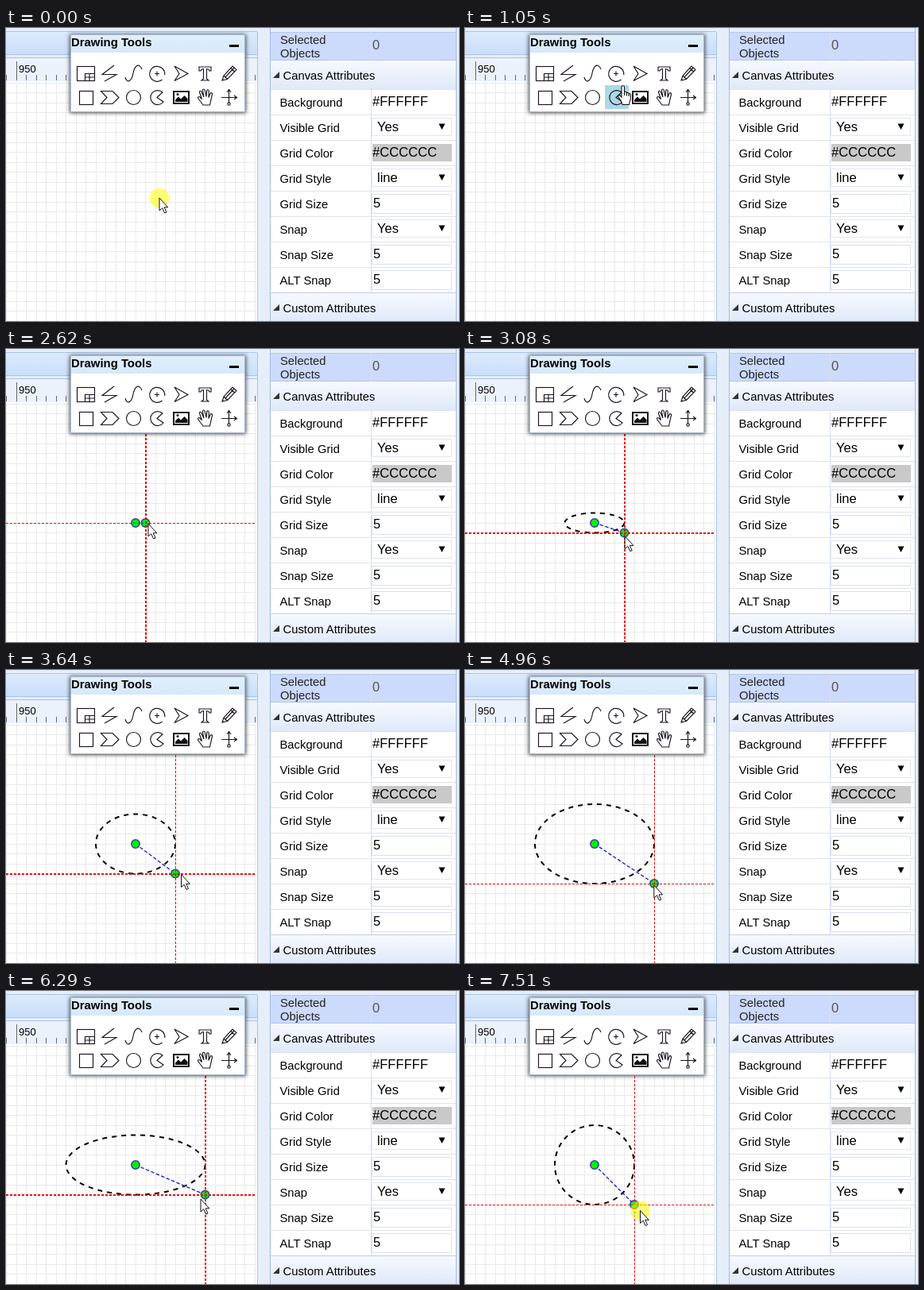
Write an HTML page that moves like this. It is 570 px wide and 369 px high and loops after 8000 ms.

```html
<!DOCTYPE html>
<html lang="en">
<head>
<meta charset="utf-8">
<title>Drawing tools</title>
<style>
html, body { margin: 0; width: 100%; height: 100%; overflow: hidden; background: #e6eefa; }
svg { display: block; width: 570px; height: 369px; font: 14.8px "Liberation Sans", Arial, sans-serif; }
.val { font-size: 16.6px; }
.icon { fill: none; stroke: #1c1420; stroke-width: 1.15; }
.crisp { shape-rendering: crispEdges; }
</style>
</head>
<body>
<svg viewBox="0 0 570 369">
  <defs>
    <linearGradient id="bar" x2="0" y2="1"><stop stop-color="#dcebfd"/><stop offset="1" stop-color="#c9defa"/></linearGradient>
    <linearGradient id="head" x2="0" y2="1"><stop stop-color="#f6f9fe"/><stop offset="1" stop-color="#dfe8f9"/></linearGradient>
    <linearGradient id="title" x2="0" y2="1"><stop stop-color="#e2effc"/><stop offset="1" stop-color="#d5e8fb"/></linearGradient>
    <filter id="shade" x="-10%" y="-20%" width="120%" height="140%"><feGaussianBlur stdDeviation="2.4"/></filter>
    <clipPath id="area"><rect y="67" width="314" height="302"/></clipPath>
  </defs>

  <rect width="570" height="369" fill="#e6eefa"/>
  <rect y="5" width="316" height="28" fill="url(#bar)"/>
  <path class="crisp" d="M0 4.5H316M0 33.5H316M0 37.5H316" stroke="#a9c3ea"/>
  <rect y="38" width="316" height="29" fill="#ebf2fc"/>
  <rect y="67" width="316" height="302" fill="#fff"/>
  <path id="grid" class="crisp" stroke="#e9e9e9"/>
  <path id="ticks" class="crisp" stroke="#666"/>
  <text x="16" y="55.5" font-size="13">950</text>
  <path class="crisp" d="M316.5 5V369" stroke="#a9c3ea"/>

  <g id="panel"></g>

  <g id="drawing" clip-path="url(#area)">
    <ellipse id="oval" cx="163" cy="219" fill="none" stroke="#000" stroke-width="2" stroke-dasharray="6 6"/>
    <path id="radius" stroke="#1616c8" stroke-width="1.3" stroke-dasharray="4.5 2.5"/>
    <g fill="#00f000" stroke="#3a3ab0" stroke-width="1.5">
      <circle id="centre" cx="163" cy="219" r="5.2"/>
      <circle id="knob" r="5.2"/>
    </g>
    <g class="crisp" stroke="#f00000" stroke-dasharray="3 2">
      <path id="vline"/>
      <path id="hline"/>
    </g>
  </g>

  <rect x="80" y="8" width="222" height="99" fill="#333" opacity=".85" filter="url(#shade)"/>
  <rect x="81.5" y="8.5" width="219" height="97" fill="#fff" stroke="#a4b8cc"/>
  <rect x="82" y="9" width="218" height="22" fill="url(#title)"/>
  <text x="82" y="23" font-size="14.9" font-weight="bold">Drawing Tools</text>
  <rect x="281" y="21" width="12" height="3"/>
  <rect id="cell" x="176" width="30" height="30" fill="#add8e6"/>

  <g class="icon">
    <rect x="89.5" y="48.5" width="22" height="18"/>
    <path d="M99.5 66V57.5H111M99.5 62H111M105 57.5V66"/>
    <path d="M136 47L121 58.500H139L124 67"/>
    <path d="M150 62C152 70 158 68 160 57S168 44 171 52"/>
    <path d="M196.500 65A9.500 9.500 0 1 1 199.700 59M187 57.500H193M190 54.500V60.500"/>
    <path d="M212 48L229 57.500L212 66.500L218 57.500Z"/>
    <path d="M243 49H258V54H256C255.500 52 255 51.500 252.500 51.500V64L255 66H246L248.500 64V51.500C246 51.500 245.500 52 245 54H243Z"/>
    <path d="M272 66L274 60L285 48L290 52.500L278.500 64.500ZM274 60L278.500 64.500M276 62L287 50M283 50.500L287.500 55M272 66L274 65"/>
    <rect x="92.500" y="79.500" width="17" height="17"/>
    <path d="M119.500 79.500H134L142 87.500L134 95.500H119.500L127 87.500Z"/>
    <circle cx="160.500" cy="87.500" r="9"/>
    <path d="M197 81A9 9 0 1 0 198 93L190 87.500Z"/>
    <rect x="211" y="80" width="19" height="15" fill="#fff" stroke-width="2"/>
    <path d="M213 93V90.500L217 86.500L220 89.500L224.500 85L228.500 89V93Z" fill="#111" stroke="none"/>
    <circle cx="216" cy="83.500" r="1.500" fill="#111" stroke="none"/>
    <path d="M248 97L242 89C240.500 87 243 85.500 244.500 87.500L246.500 89.500L243.500 81C243 79 245.500 78.500 246.200 80.500L249 87L247.500 78.500C247.500 76.500 250 76.500 250.300 78.500L252 86.500L252.700 79C253 77 255.300 77.500 255.200 79.500L255 87.500L257 82.500C257.700 81 260 81.500 259.500 83.500L257.500 92L256.500 97Z"/>
    <path d="M280.500 94V78M278 81L280.500 77.500L283 81M271 87.500H290M287 85L290.500 87.500L287 90"/>
    <circle cx="280.500" cy="95.500" r="1.700"/>
  </g>

  <circle id="glow" r="12.2" fill="#ff0" opacity=".55"/>
  <path id="arrow" d="M0 0V16L3.700 12.700L6.600 19L9 18L6.200 11.800H10.800Z" fill="#fff" stroke="#111" stroke-linejoin="round"/>
  <path id="hand" d="M-2 11V1.500C-2 -.8 1.500 -.8 1.500 1.500V8C2.500 6.800 4.300 7.200 4.500 8.800C5.500 7.800 7 8.300 7.100 9.800C8.100 9 9.300 9.600 9.300 11V16C9.300 19 7.500 20 7.500 23.500H-1C-1 20 -3.500 18 -6 14C-7.200 12 -5 10.800 -3.600 12.300L-2 14ZM1.500 8V12M4.500 9V12.500M7.100 10V13" fill="#fff" stroke="#111" stroke-width="1.100"/>
</svg>
<script>
const LOOP = 8000, UNIT = 12.5, CX = 163, CY = 219;
const $ = id => document.getElementById(id);
const set = (id, attrs) => { for (const k in attrs) $(id).setAttribute(k, attrs[k]); };
const show = (id, on) => set(id, { visibility: on ? 'visible' : 'hidden' });
const crisp = v => Math.floor(v) + 0.5;

function drawRulers() {
  let grid = '', ticks = '';
  for (let x = 0.5; x < 314; x += UNIT) {
    grid += `M${crisp(x)} 67V369`;
    ticks += `M${crisp(x)} ${x === 13 ? 42 : 59}V66`;
  }
  for (let y = 69; y < 369; y += UNIT) grid += `M0 ${crisp(y)}H314`;
  set('grid', { d: grid });
  set('ticks', { d: ticks });
}

function drawPanel() {
  const rect = (x, y, w, h, fill, stroke = 'none') =>
    `<rect x="${x}" y="${y}" width="${w}" height="${h}" fill="${fill}" stroke="${stroke}"/>`;
  const text = (x, y, s, extra = '') => `<text x="${x}" y="${y}" ${extra}>${s}</text>`;
  const line = (d, color) => `<path class="crisp" d="${d}" stroke="${color}"/>`;
  const head = (y, s) => rect(333, y, 233, 37, 'url(#head)') +
    `<path d="M336 ${y + 22}L344 ${y + 14}V${y + 22}Z" fill="#333"/>` + text(348.5, y + 23.5, s);
  const rows = [
    ['Background', '#FFFFFF', 'plain'], ['Visible Grid', 'Yes', 'list'],
    ['Grid Color', '#CCCCCC', 'swatch'], ['Grid Style', 'line', 'list'],
    ['Grid Size', '5', 'input'], ['Snap', 'Yes', 'list'],
    ['Snap Size', '5', 'input'], ['ALT Snap', '5', 'input']
  ];
  let out = rect(333, 5, 233, 36, '#ccdafc') + line('M333 5.5H566M333 40.5H566', '#b4c6ea') +
    text(345, 19.5, 'Selected', 'fill="#222"') + text(345, 37, 'Objects', 'fill="#222"') +
    text(461, 27, '0', 'class="val" fill="#555"') +
    head(41, 'Canvas Attributes') + rect(333, 78, 233, 256, '#fff');
  rows.forEach(([label, value, kind], i) => {
    const y = 77 + i * 32;
    out += line(`M333 ${y + 0.5}H566`, '#dfe3ea') + text(344.5, y + 22, label);
    if (kind === 'swatch') out += rect(461, y + 5, 100, 22, '#c9c9c9');
    if (kind === 'list') {
      out += rect(460.5, y + 4.5, 100, 22, '#fff', '#e2e5f2') +
        `<path d="M544.5 ${y + 11.5}H552.5L548.5 ${y + 19}Z"/>`;
    }
    if (kind === 'input') out += rect(460.5, y + 4.5, 100, 24, '#fff', '#d9def2');
    const x = kind === 'list' ? 467 : kind === 'input' ? 462 : 461;
    out += text(x, y + 20.5, value, 'class="val"');
  });
  out += head(334, 'Custom Attributes') + line('M333 333.5H566', '#c3d0e8') +
    line('M459.5 5V41M459.5 78V333', '#d9def2') + line('M332.5 0V369M566.5 0V369', '#a3b9e2');
  $('panel').innerHTML = out;
}

// Pointer moves: first step, last step, step count, pointer x, y, snapped column, row
const moves = [
  [0, 0, 1, 193, 214, 2, -11],
  [580, 1050, 7, 199, 73, 2, -11],
  [1130, 1370, 4, 192, 54, 2, -11],
  [1600, 1920, 5, 169.5, 224, 0, 0],
  [2530, 2530, 1, 172, 223, 0, 0],
  [2620, 2620, 1, 179, 220, 1, 0],
  [2700, 3320, 9, 217, 247, 4, 2],
  [3400, 3640, 4, 220.5, 257.5, 4, 3],
  [4410, 4480, 2, 240, 270, 6, 4],
  [4960, 5340, 6, 210.5, 284.5, 4, 5],
  [5660, 5890, 4, 261, 248, 8, 2],
  [6290, 6290, 1, 245, 262, 7, 3],
  [6360, 6500, 3, 220.5, 276.5, 4, 4]
];
const presses = [[0, 580], [1370, 1600], [2240, 2530], [7510, LOOP]];

function buildSteps() {
  const steps = [];
  let from = { x: 193, y: 214, c: 2, r: -11 };
  for (const [t0, t1, n, x, y, c, r] of moves) {
    for (let k = 1; k <= n; k++) {
      const p = k / n, e = p * p * (3 - 2 * p);
      const mix = (a, b) => a + (b - a) * e;
      steps.push({
        t: n > 1 ? t0 + (t1 - t0) * (k - 1) / (n - 1) : t0,
        x: mix(from.x, x),
        y: mix(from.y, y),
        c: Math.round(mix(from.c, c)),
        r: Math.round(mix(from.r, r))
      });
    }
    from = { x, y, c, r };
  }
  return steps;
}
const steps = buildSteps();

// Guides between whole pixels cover two of them
const guideWidth = v => v % 1 ? 2 : 1;

function render(t) {
  const s = steps.findLast(step => step.t <= t + 0.01);
  const overTools = s.y < 103, drawing = t >= 2240;
  const x = CX + s.c * UNIT, y = CY + s.r * UNIT;

  const place = { transform: `translate(${s.x} ${s.y})` };
  for (const id of ['arrow', 'hand', 'glow']) set(id, place);
  show('arrow', !overTools);
  show('hand', overTools);
  show('glow', presses.some(([a, b]) => t >= a && t < b));
  show('cell', overTools);
  set('cell', { y: s.y < 72 ? 42 : 72 });

  set('drawing', { display: t >= 1600 && !overTools ? 'inline' : 'none' });
  set('vline', { d: `M${crisp(x)} 67V369`, 'stroke-width': guideWidth(x) });
  set('hline', { d: `M0 ${crisp(y)}H314`, 'stroke-width': guideWidth(y) });
  set('oval', { rx: Math.abs(x - CX), ry: Math.abs(y - CY) });
  set('radius', { d: `M${CX} ${CY}L${x} ${y}` });
  set('knob', { cx: x, cy: y });
  for (const id of ['oval', 'radius', 'centre', 'knob']) show(id, drawing);
}

function frame() {
  render(performance.now() % LOOP);
  requestAnimationFrame(frame);
}
drawRulers();
drawPanel();
frame();
</script>
</body>
</html>
```
